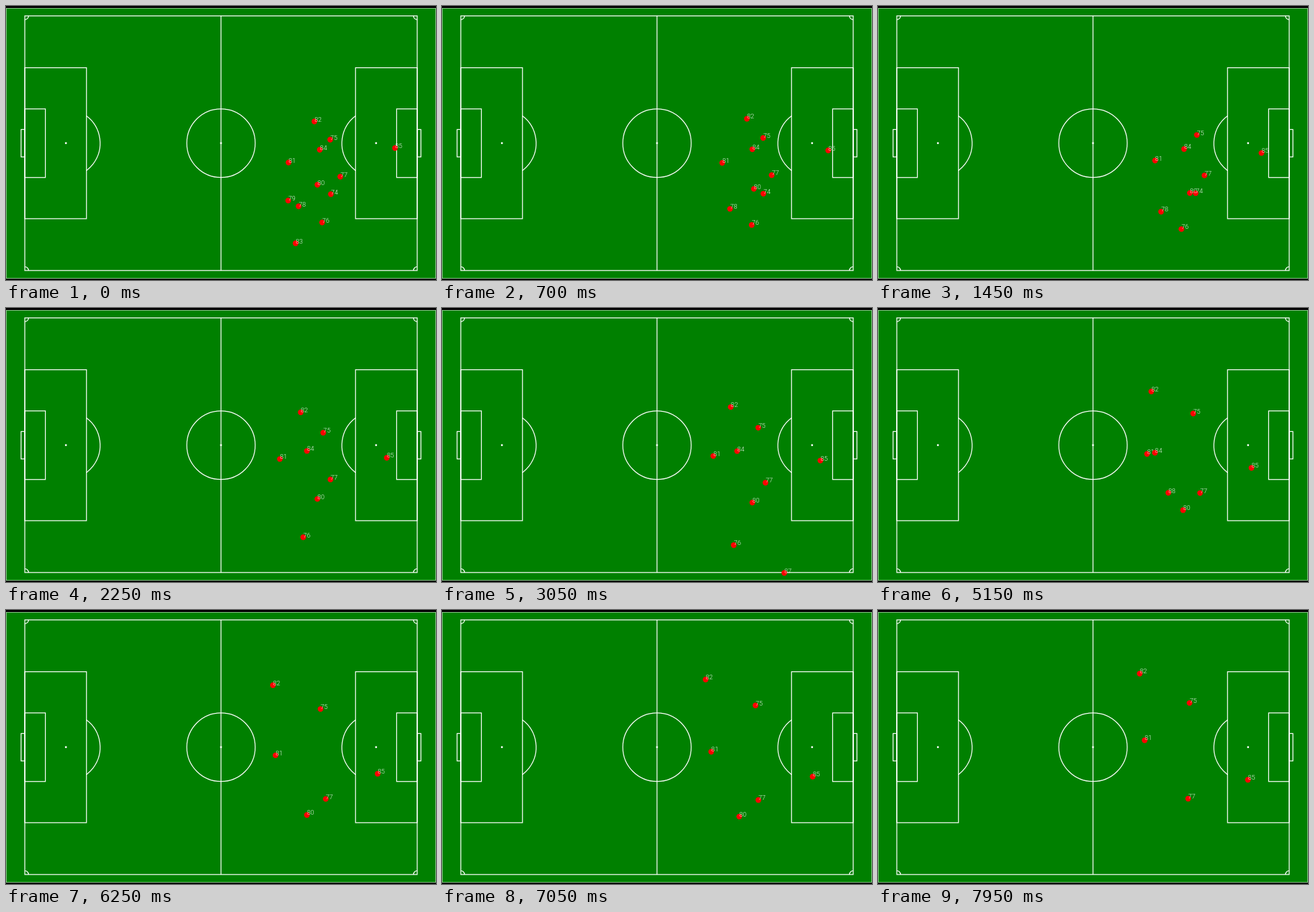
An HTML page with a canvas for the animation above (8000 ms loop, 640x407 px).

```html
<!DOCTYPE html>
<html lang="en">
<head>
<meta charset="utf-8">
<title>Pitch tracking</title>
<style>
  html, body { margin: 0; width: 100%; height: 100%; overflow: hidden; background: #000; }
  canvas { display: block; width: 640px; height: 407px; }
</style>
</head>
<body>
<canvas id="stage" width="640" height="407"></canvas>
<script>
const ctx = document.getElementById('stage').getContext('2d');
const LOOP = 8000, STEP = 50;

// Pitch geometry: sizes in metres, scaled so that 105 m span 584 px
const METRE = 584 / 105;
const MID_X = 320, MID_Y = 203.8;
const HALF_LENGTH = 52.5, HALF_WIDTH = 34;
const CIRCLE = 9.15, PENALTY_SPOT = 11, PENALTY_DEPTH = 16.5;

// A player follows a smooth curve through points spaced evenly over from..to
function player(id, points, from = 0, to = LOOP) {
  return { id, points, from, to };
}

const players = [
  player(74, [[483.5, 279.5], [468, 277.5]], 0, 2100),
  player(75, [[482.5, 198.5], [471.3, 181.5], [469, 155], [463.5, 138]]),
  player(76, [[470.5, 321.5], [448, 334.5], [430, 360]], 0, 3500),
  player(77, [[497.5, 253.5], [482, 257], [479, 276], [461, 280]]),
  player(78, [[435.5, 297.5], [416, 308.5]], 0, 2000),
  player(79, [[420, 289], [415, 292]], 0, 550),
  player(80, [[463.5, 265.5], [460.5, 292], [442, 307]], 0, 7100),
  player(81, [[420.5, 232.5], [409, 226], [401, 217], [401, 216.5], [396.5, 192]]),
  player(82, [[459, 171.5], [434, 151], [405, 122], [389.5, 94]], 0, LOOP),
  player(83, [[431, 352.5], [425, 356]], 0, 550),
  player(84, [[467, 213.5], [441.5, 212.5], [404, 216]], 0, 5700),
  player(85, [[579, 211], [559.5, 231.5], [550.5, 252.5]]),
  player(87, [[509.5, 393.5]], 2700, 4300),
  player(88, [[452, 279.5], [424, 272.5]], 3800, 5700)
];

// Tracking of one player drops out for a while
const dropout = { id: 82, from: 900, to: 2000 };

// Neville interpolation, u from 0 to 1
function along(points, u) {
  const s = u * (points.length - 1);
  let row = points;
  for (let span = 1; span < points.length; span++) {
    row = row.slice(1).map((next, i) => {
      const k = (s - i) / span;
      return next.map((v, axis) => row[i][axis] + (v - row[i][axis]) * k);
    });
  }
  return row[0];
}

function arc(x, y, r, from, to) {
  ctx.beginPath();
  ctx.arc(x, y, r, from, to);
  ctx.stroke();
}

function dot(x, y, r, color) {
  ctx.fillStyle = color;
  ctx.beginPath();
  ctx.arc(x, y, r, 0, 2 * Math.PI);
  ctx.fill();
}

// Box on the goal line, centred on the goal
function goalBox(depth, width) {
  ctx.strokeRect(-HALF_LENGTH, -width / 2, depth, width);
}

function drawHalf() {
  goalBox(PENALTY_DEPTH, 40.32);
  goalBox(5.5, 18.32);
  goalBox(-1, 7.32);
  const spotX = PENALTY_SPOT - HALF_LENGTH;
  const reach = Math.acos((PENALTY_DEPTH - PENALTY_SPOT) / CIRCLE);
  arc(spotX, 0, CIRCLE, -reach, reach);
  arc(-HALF_LENGTH, -HALF_WIDTH, 1, 0, Math.PI / 2);
  arc(-HALF_LENGTH, HALF_WIDTH, 1, -Math.PI / 2, 0);
  dot(spotX, 0, 0.26, '#fff');
}

function drawPitch() {
  ctx.fillStyle = '#000';
  ctx.fillRect(0, 0, 640, 407);
  ctx.fillStyle = '#008000';
  ctx.fillRect(0, 3, 640, 402);
  ctx.lineWidth = 1;
  ctx.strokeStyle = '#8cc68c';
  ctx.strokeRect(0.5, 3.5, 639, 401);

  ctx.save();
  ctx.translate(MID_X, MID_Y);
  ctx.scale(METRE, METRE);
  ctx.lineWidth = 1.25 / METRE;
  ctx.strokeStyle = '#fff';
  ctx.strokeRect(-HALF_LENGTH, -HALF_WIDTH, 2 * HALF_LENGTH, 2 * HALF_WIDTH);
  ctx.beginPath();
  ctx.moveTo(0, -HALF_WIDTH);
  ctx.lineTo(0, HALF_WIDTH);
  ctx.stroke();
  arc(0, 0, CIRCLE, 0, 2 * Math.PI);
  dot(0, 0, 0.26, '#fff');
  drawHalf();
  ctx.scale(-1, 1);
  drawHalf();
  ctx.restore();
}

function isSeen({ id, from, to }, t) {
  const lost = id === dropout.id && t >= dropout.from && t < dropout.to;
  return t >= from && t < to && !lost;
}

function drawPlayer({ id, points, from, to }, t) {
  const [x, y] = along(points, (t - from) / (to - from));
  dot(x, y, 4.2, '#f00');
  ctx.fillStyle = 'rgba(255, 255, 255, 0.88)';
  ctx.fillText(id, x + 0.2, y);
}

function draw(now) {
  const t = Math.floor((now % LOOP) / STEP) * STEP;
  drawPitch();
  ctx.font = '300 9.5px Roboto, sans-serif';
  for (const p of players) {
    if (isSeen(p, t)) drawPlayer(p, t);
  }
}

const start = performance.now();
function tick() {
  draw(performance.now() - start);
  requestAnimationFrame(tick);
}
tick();
</script>
</body>
</html>
```
